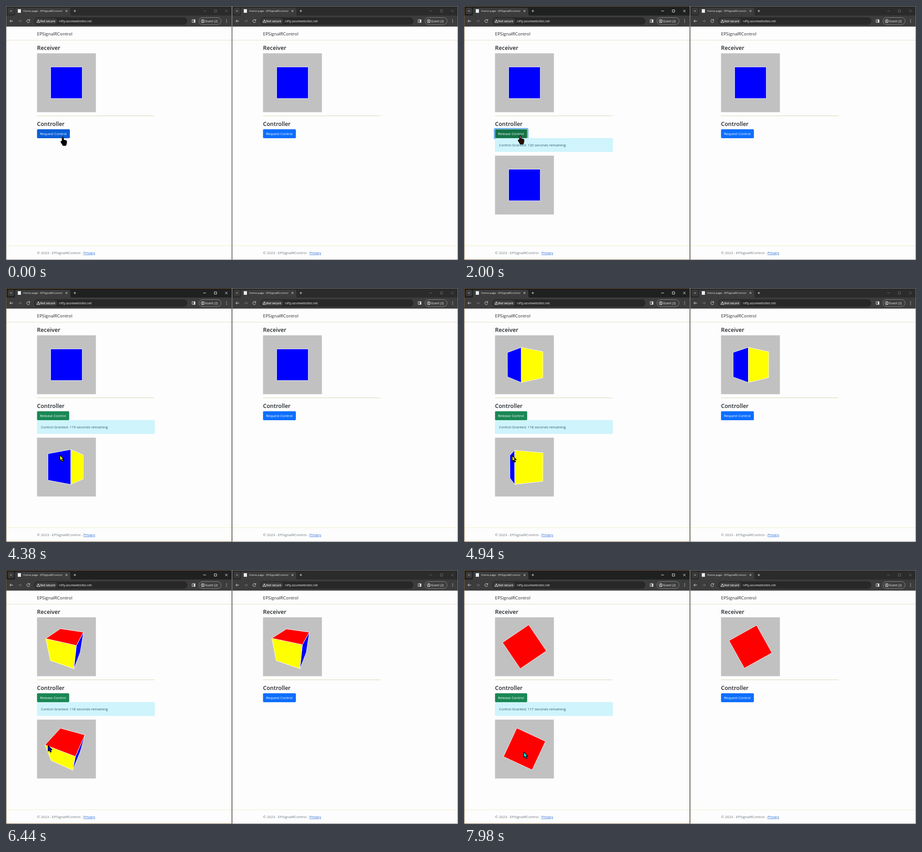
Recreate the animation shown at these times as an HTML page. Size 998 px wide and 561 px high, loop 8000 ms.

```html
<!DOCTYPE html>
<html lang="en">
<head>
<meta charset="utf-8">
<title>Shared cube control</title>
<style>
  html, body { margin: 0; width: 100%; height: 100%; overflow: hidden; background: #fdfdfd; }
  svg { display: block; width: 998px; height: 561px; }
  text { font-family: "Open Sans", "Noto Sans", sans-serif; font-size: 7.85px; fill: #212529; white-space: pre; }
  .brand { font-size: 9.75px; }
  .heading { font-size: 12.5px; font-weight: 600; }
  .button { fill: #fff; }
  .muted { fill: #6c757d; }
  .link { fill: #2468d8; text-decoration: underline; }
  .chrome text { fill: #eee; font-size: 6.75px; }
  .chrome .tab { font-size: 6.05px; }
  .icon { fill: none; stroke: #ddd; stroke-width: 1; }
  .dim { stroke: #777; }
  .pad { fill: #c1c1c1; }
  .cube polygon { stroke: #fff; stroke-width: .9; stroke-linejoin: round; }
  .invert { fill: #fff; mix-blend-mode: difference; }
  .outline { fill: none; stroke: #000; stroke-width: 1.3; stroke-linejoin: round; }
</style>
</head>
<body>
<svg viewBox="0 0 998 561">
  <defs>
    <g id="chrome" class="chrome">
      <rect x="4" y="4" width="14" height="14" rx="4" fill="#3a3a3a"/>
      <path class="icon" d="M9 10l2 2 2-2"/>
      <path d="M16 21.5q4 0 4-4V8q0-4 4-4H138q4 0 4 4v9.500q0 4 4 4z" fill="#3c3c3c"/>
      <rect y="21" width="499" height="24.500" fill="#3c3c3c"/>
      <rect x="26" y="7" width="7" height="8" fill="#e8eef2"/>
      <text class="tab" x="38" y="13.300">Home page - EPSignalRControl</text>
      <path class="icon" d="M131.500 9l4 4m0-4l-4 4M149.500 11h5m-2.500-2.500v5"/>
      <path class="icon" d="M15.500 33.300h-7m3-3l-3 3 3 3"/>
      <path class="icon dim" d="M27 33.300h7m-3-3l3 3-3 3"/>
      <path class="icon" d="M51.800 31.200a3.300 3.300 0 1 0 .6 2.800M52.400 29.500v2.400H50"/>
      <rect x="62" y="25" width="338.500" height="16.500" rx="8.250" fill="#282828"/>
      <rect x="64" y="27" width="49" height="12.500" rx="6.250" fill="#3c3c3c"/>
      <path class="icon" d="M71.500 30l3.500 6.300h-7zM71.500 32v2.200"/>
      <text x="75.500" y="35.700" font-weight="600" style="font-size:6.400px">Not secure</text>
      <text x="117" y="35.700">nifty.azurewebsites.net</text>
      <path class="icon" d="M411 30.200h6.500v6H411z"/>
      <path d="M414.500 30h3.500v6.500h-3.500z" fill="#ddd"/>
      <rect class="icon" x="426" y="25.500" width="49" height="15.500" rx="7.750" style="stroke:#888"/>
      <circle class="icon" cx="434.500" cy="33.300" r="3.700"/>
      <circle cx="434.500" cy="32.300" r="1.300" fill="#ddd"/>
      <path class="icon" d="M432 35.800q2.500-2 5 0"/>
      <text x="439.500" y="35.700">Guest (2)</text>
      <g fill="#ddd"><circle cx="487" cy="30.300" r=".8"/><circle cx="487" cy="33.300" r=".8"/><circle cx="487" cy="36.300" r=".8"/></g>
    </g>
    <path id="controls" d="M435.500 11h6M460 8.500h5v5h-5zM484 8.500l5 5m0-5l-5 5" fill="none"/>
    <g id="page">
      <rect y="45" width="499" height="516" fill="#fdfdfd"/>
      <text class="brand" x="68.500" y="64.500">EPSignalRControl</text>
      <path d="M0 75.500H499" stroke="#dfdfcb"/>
      <text class="heading" x="68.500" y="96.800">Receiver</text>
      <rect class="pad" x="68.500" y="104.500" width="130" height="130"/>
      <path d="M68.500 242.500H328" stroke="#d8d8b4"/>
      <text class="heading" x="68.500" y="264.600">Controller</text>
      <path d="M0 529.500H499" stroke="#efefc8"/>
      <text class="muted" x="68.500" y="548">© 2023 - EPSignalRControl - <tspan class="link">Privacy</tspan></text>
    </g>
    <path id="arrowShape" d="M0 0V12.200L2.900 9.800 4.900 14.500 7.100 13.500 5.100 9H8.800Z"/>
    <path id="handShape" d="M-1.500 1a1.500 1.500 0 0 1 3 0V6l5 1.200q2 .5 2 2.500l-.7 5-1.300 3.300H.3L-4.200 10.500q-.6-2 1.500-1.800l1.200.8z"/>
  </defs>

  <rect id="titleLeft" width="499" height="22"/>
  <rect x="499" width="499" height="22" fill="#2b2b2b"/>
  <use href="#page"/><use href="#page" x="499"/>
  <use href="#chrome"/><use href="#chrome" x="499"/>
  <use id="controlsLeft" href="#controls"/>
  <use href="#controls" x="499" stroke="#666"/>

  <rect x="567.500" y="272.300" width="72.500" height="19.700" rx="2" fill="#0d6efd"/>
  <text class="button" x="574" y="285">Request Control</text>

  <g id="ring">
    <rect x="66" y="269.700" width="76" height="24.900" rx="4" fill="#258cfb"/>
    <rect x="67.500" y="271.300" width="73" height="21.700" rx="3" fill="#fff"/>
  </g>
  <rect id="button" x="68.500" y="272.300" height="19.700" rx="2"/>
  <text id="buttonText" class="button" x="75" y="285"></text>

  <g id="granted">
    <rect x="68.800" y="292.300" width="259.500" height="29.400" rx="2" fill="#cff4fc" stroke="#bdf0fa" stroke-width=".6"/>
    <text id="status" x="77.300" y="310" style="fill:#2a5d68"></text>
    <rect class="pad" x="68.500" y="330.500" width="130" height="130"/>
    <g id="cubeControl" class="cube" transform="translate(133.500 395.300)"></g>
  </g>
  <g id="cubeLeft" class="cube" transform="translate(133.500 169.500)"></g>
  <g id="cubeRight" class="cube" transform="translate(632.500 169.500)"></g>

  <path d="M499.500 0V560.500H997.500V0.500H499" fill="none" stroke="#777"/>
  <rect id="border" x=".5" y=".5" width="498" height="560" fill="none"/>

  <use id="cursorFill" class="invert"/>
  <use id="cursorLine" class="outline"/>
</svg>
<script>
const LOOP = 8000;
const FOCUS = 300, GRANT = 560, LEAVE = 2850, GRAB = 3700;
const COUNTS = [2600, 4540, 6480];
const COLORS = ['#ff0', '#f00', '#00f'];
const EYE = 5, FOCAL = 139.4;

// time, yaw, pitch in degrees
const TURN = [
  [4110, 0, 0], [4380, 35, 0], [5285, 90, 2], [5330, 91, 3.5], [5600, 99.5, 12],
  [6125, 113, 33.5], [6170, 113, 35], [6440, 115, 51], [7105, 107, 77],
  [7150, 104, 80], [7420, 89, 87], [7665, 61, 90], [7710, 56, 90], [7980, 25, 90]
];
// time, x, y of the pointer tip
const POINTER = [
  [0, 125.5, 290], [300, 125.5, 290], [800, 124, 287], [2700, 124, 287],
  [3500, 131, 369], [4110, 131, 369], [4380, 119, 369], [5330, 98, 371], [5600, 96, 374.5],
  [6170, 92, 383], [6440, 93, 388], [7150, 98, 397], [7420, 107, 401], [7980, 132, 402]
];

const el = id => document.getElementById(id);
const set = (id, attrs) => {
  for (const name in attrs) el(id).setAttribute(name, attrs[name]);
};
const show = (id, on) => set(id, { visibility: on ? 'visible' : 'hidden' });

function sample(track, t) {
  const i = track.findIndex(key => key[0] > t);
  if (i === 0) return track[0].slice(1);
  if (i < 0) return track[track.length - 1].slice(1);
  const a = track[i - 1], b = track[i], k = (t - a[0]) / (b[0] - a[0]);
  return [a[1] + (b[1] - a[1]) * k, a[2] + (b[2] - a[2]) * k];
}

function rotate([x, y, z], yaw, pitch) {
  const cy = Math.cos(yaw), sy = Math.sin(yaw), cp = Math.cos(pitch), sp = Math.sin(pitch);
  const depth = x * sy + z * cy;
  return [x * cy - z * sy, y * cp - depth * sp, y * sp + depth * cp];
}

function drawCube(id, t) {
  const [yaw, pitch] = sample(TURN, t).map(a => a * Math.PI / 180);
  let faces = '';
  for (let axis = 0; axis < 3; axis++) for (const side of [-1, 1]) {
    const normal = [0, 0, 0];
    normal[axis] = side;
    if (rotate(normal, yaw, pitch)[2] * EYE <= 1) continue;
    const points = [[-1, -1], [1, -1], [1, 1], [-1, 1]].map(([u, v]) => {
      const corner = normal.slice();
      corner[(axis + 1) % 3] = u;
      corner[(axis + 2) % 3] = v;
      const [x, y, z] = rotate(corner, yaw, pitch), scale = FOCAL / (EYE - z);
      return (x * scale).toFixed(2) + ',' + (-y * scale).toFixed(2);
    });
    faces += `<polygon points="${points.join(' ')}" fill="${COLORS[axis]}"/>`;
  }
  el(id).innerHTML = faces;
}

function render(t) {
  const focused = t >= FOCUS, granted = t >= GRANT, hover = t < LEAVE;
  set('titleLeft', { fill: focused ? '#1f2020' : '#2b2b2b' });
  set('controlsLeft', { stroke: focused ? '#eee' : '#666' });
  set('border', { stroke: focused ? '#765a38' : '#777' });
  show('ring', focused && t < GRAB);
  show('granted', granted);
  set('button', {
    width: granted ? 71 : 72.5,
    fill: granted ? (hover ? '#157347' : '#198754') : '#0b5ed7'
  });
  el('buttonText').textContent = (granted ? 'Release' : 'Request') + ' Control';
  const left = 120 - COUNTS.filter(time => t >= time).length;
  el('status').textContent = `Control Granted: ${left} seconds remaining`;

  drawCube('cubeControl', t);
  drawCube('cubeLeft', t - 270);
  drawCube('cubeRight', t - 315);

  const cursor = {
    href: hover ? '#handShape' : '#arrowShape',
    transform: `translate(${sample(POINTER, t).join(' ')})`
  };
  set('cursorFill', cursor);
  set('cursorLine', cursor);
}

const start = performance.now();
function tick() {
  render((performance.now() - start) % LOOP);
  requestAnimationFrame(tick);
}
tick();
</script>
</body>
</html>
```
